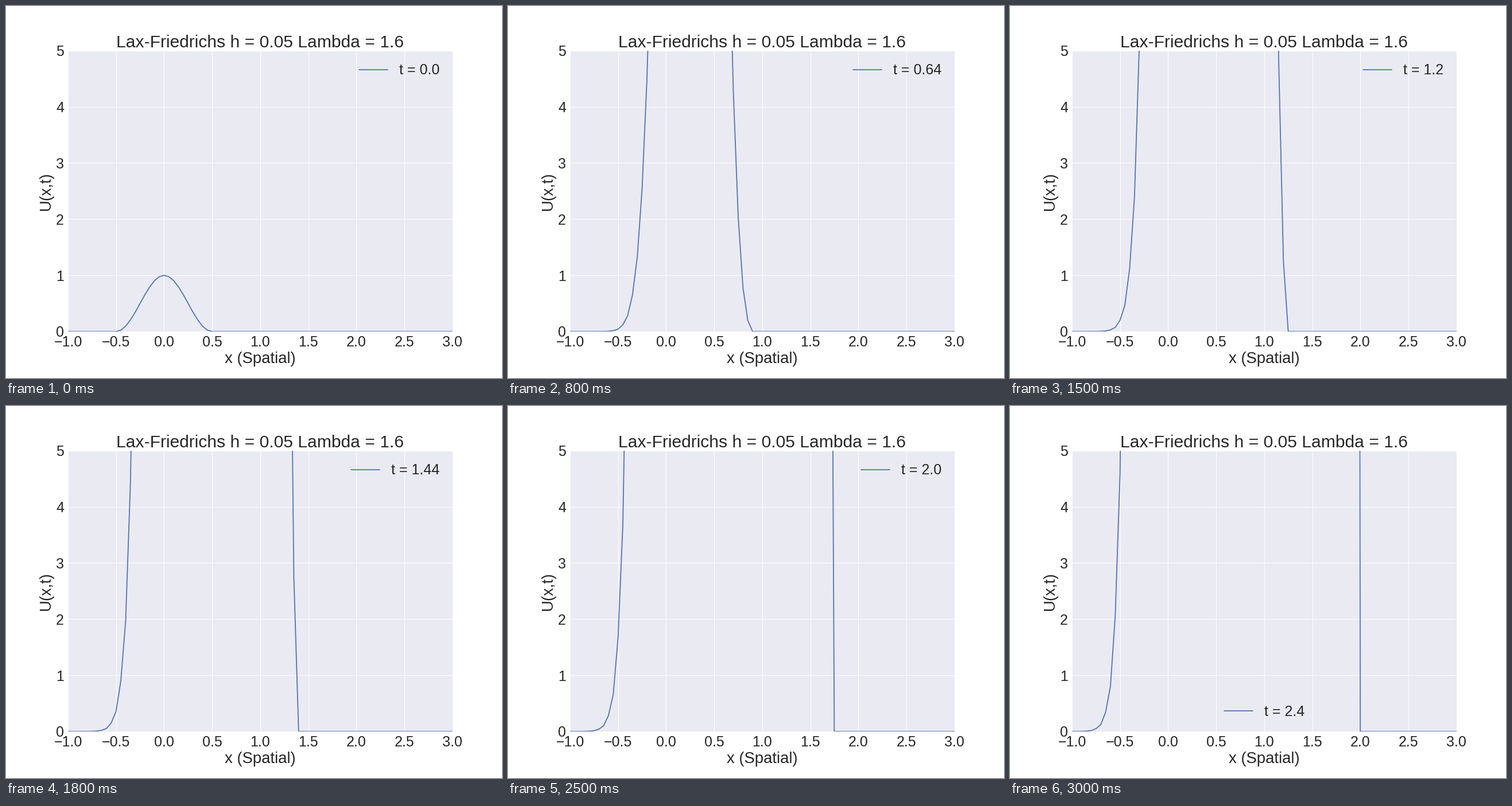
Recreate the animation shown at these times as a matplotlib script. Size 864 px wide and 648 px high, loop 3100 ms.

```python
import numpy as np
import matplotlib.pyplot as plt
from matplotlib.animation import FuncAnimation

H, LAM = 0.05, 1.6
STEPS = 30
DARK = "0.15"

plt.rcParams.update({
    "font.family": "Liberation Sans",
    "text.color": DARK,
    "axes.labelcolor": DARK,
    "axes.titlesize": 30,
    "axes.labelsize": 27.5,
    "axes.facecolor": "#EAEAF2",
    "axes.edgecolor": "white",
    "axes.linewidth": 0,
    "axes.axisbelow": True,
    "axes.grid": True,
    "grid.color": "white",
    "grid.linestyle": "-",
    "grid.linewidth": 1,
    "xtick.color": DARK,
    "ytick.color": DARK,
    "xtick.labelsize": 25,
    "ytick.labelsize": 25,
    "xtick.major.size": 0,
    "ytick.major.size": 0,
    "xtick.major.pad": 7,
    "ytick.major.pad": 7,
    "legend.fontsize": 25,
    "legend.frameon": False,
    "lines.solid_capstyle": "round",
})


def solve(x):
    """Return the wave at every time step; this scheme is unstable and grows."""
    u = np.where(np.abs(x) < 0.5 - 1e-9, np.cos(np.pi * x) ** 2, 0.0)
    waves = [u]
    for _ in range(STEPS):
        new = np.zeros_like(u)
        new[1:-1] = (LAM + 1) / 2 * u[:-2] + (LAM - 1) / 2 * u[2:]
        u = new
        waves.append(u)
    return waves


x = np.linspace(-1, 3, 81)
waves = solve(x)

fig, ax = plt.subplots(figsize=(12, 9), dpi=72)
fig.subplots_adjust(left=0.125, right=0.9, bottom=0.125, top=0.88)
line, = ax.plot(x, waves[0], color="#4C72B0", lw=1.75)
ax.set(xlim=(-1, 3), ylim=(0, 5), xlabel="x (Spatial)", ylabel="U(x,t)",
       xticks=np.arange(-1, 3.1, 0.5), yticks=range(6))
ax.set_title(f"Lax-Friedrichs h = {H} Lambda = {LAM}")


def update(n):
    line.set_ydata(waves[n])
    line.set_label(f"t = {round(n * H * LAM, 2)}")
    # "best" moves the legend away once the wave front reaches it
    ax.legend(loc="best")
    return line,


anim = FuncAnimation(fig, update, frames=STEPS + 1, interval=100,
                     repeat=True, repeat_delay=0)
plt.show()
```
